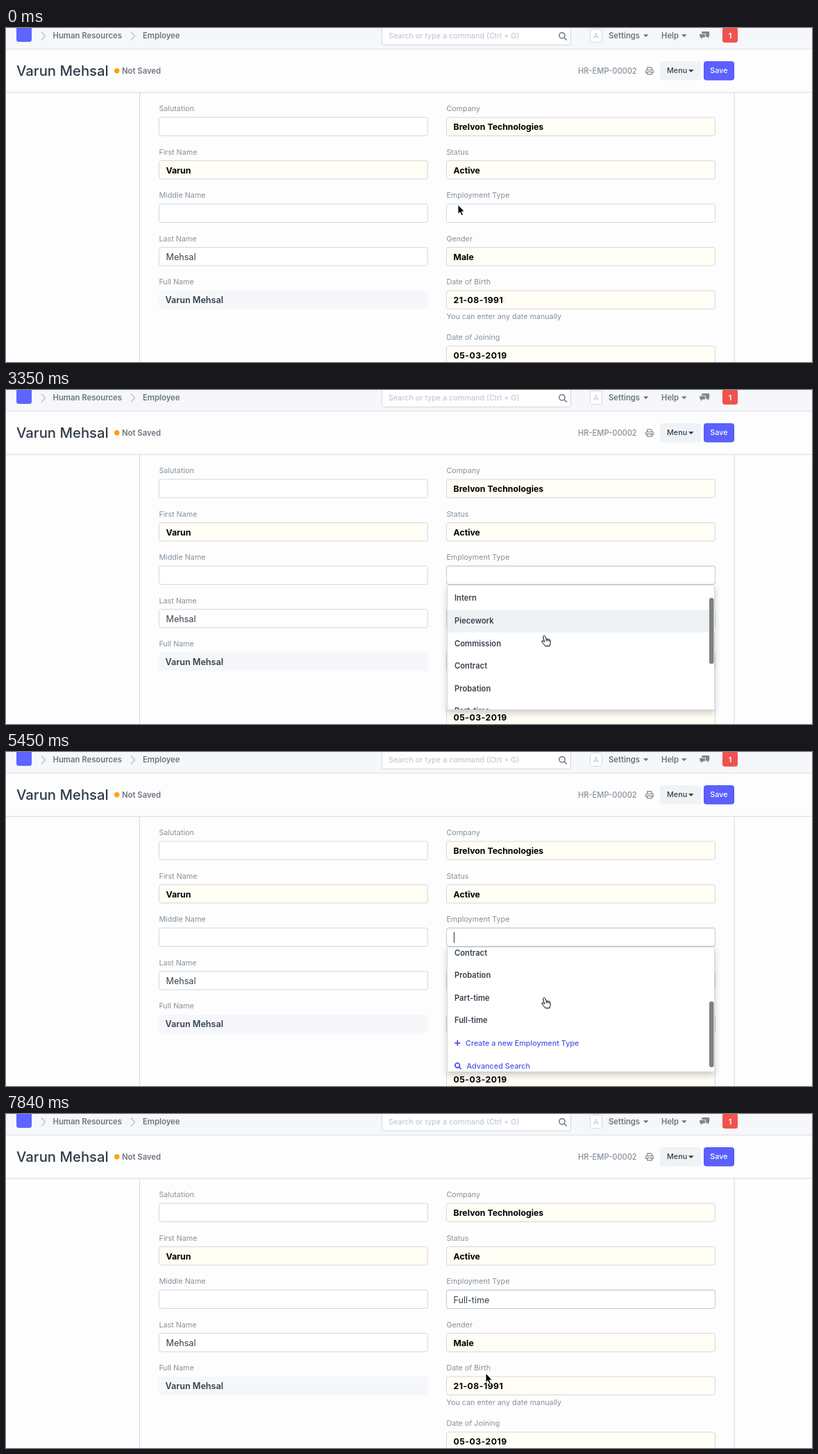
These frames come from a looping animation (1161 by 482 pixels, 8 s). An HTML page:

```html
<!DOCTYPE html>
<html lang="en">
<head>
<meta charset="utf-8">
<title>Employee form</title>
<style>
html, body { margin: 0; width: 100%; height: 100%; overflow: hidden; background: #fdfdfd; }
svg { display: block; }
text { font-family: Inter, "Liberation Sans", sans-serif; font-size: 10.8px; white-space: pre; }
.label { fill: #85919d; font-size: 10.75px; }
.value { fill: #36414c; font-size: 12.6px; }
.must { fill: #000; font-weight: 700; font-size: 12.3px; }
.date { letter-spacing: .035em; }
.nav { fill: #6c7680; font-weight: 600; font-size: 11.3px; }
.item { fill: #36414c; font-weight: 600; font-size: 11.2px; }
.link { fill: #4f52ea; font-weight: 500; }
.box { fill: #fff; stroke: #d1d8dd; }
.line { fill: none; stroke-width: 1.5; }
#menu { filter: drop-shadow(0 4px 5px rgba(0, 0, 0, .2)); }
</style>
</head>
<body>
<svg id="stage" width="1161" height="482" viewBox="0 0 1161 482">
  <path d="M0 0H1161V30H0Z" fill="#f5f7fa"/>
  <path d="M0 30.5H1161" stroke="#dde3e8"/>
  <path d="M192.5 93V482M1049 93V482M0 93H1161" fill="none" stroke="#d1d8dd"/>

  <rect x="15" y="-2" width="22" height="22" rx="3.5" fill="#5e64ff"/>
  <path d="M51 5.5l5.5 6-5.5 6M180 5.5l5.5 6-5.5 6" class="line" stroke="#bcc5cf"/>
  <text x="67.5" y="15.3" class="nav">Human Resources</text>
  <text x="197" y="15.3" class="nav">Employee</text>
  <rect x="541.5" y="-4.5" width="272" height="29" rx="3.5" class="box"/>
  <text x="551" y="15.3" fill="#b8c2cc">Search or type a command (Ctrl + G)</text>
  <g class="line" stroke="#6c7680"><circle cx="801" cy="10.8" r="4.1"/><path d="M804 14l3.8 3.8"/></g>
  <rect x="841.5" y="1.5" width="17" height="19" rx="3" class="box"/>
  <text x="850" y="15.3" text-anchor="middle" fill="#b8c2cc">A</text>
  <text x="868" y="14.7" class="nav">Settings</text>
  <text x="944" y="14.7" class="nav">Help</text>
  <path d="M918 9.3h7.6l-3.8 3.9zM973 9.3h7.6l-3.8 3.9z" fill="#6c7680"/>
  <path d="M1003.5 5h8.5q1.2 0 1.2 1.2v5q0 1.2-1.2 1.2v2.6l-2.8-2.6h-1.4V8h-5.5V6.2q0-1.2 1.2-1.2zM1000.3 8.8h6.6v4.6h-3.3l-2.5 2.6v-2.6h-.8q-1.1 0-1.1-1.1v-2.4q0-1.1 1.1-1.1z" fill="#7c8793"/>
  <rect x="1032" y="-1" width="22" height="22" rx="3.5" fill="#ef5350"/>
  <text x="1043" y="15.3" text-anchor="middle" fill="#fff" font-weight="600">1</text>

  <text x="15" y="69" fill="#303b46" font-weight="500" style="font-size:20.3px">Varun Mehsal</text>
  <circle cx="159.7" cy="61.7" r="3.7" fill="#ffa00a"/>
  <text x="167" y="65.6" class="nav">Not Saved</text>
  <text x="824" y="65.5" fill="#85919d" font-weight="500" style="font-size:11.1px">HR-EMP-00002</text>
  <path d="M923.8 60.5v-3.7h5.2l1.4 1.4v2.3M923.8 64.5h-2.1v-3q0-1 1-1h8.6q1 0 1 1v3h-1.9M923.8 63.3h6.6v3.6h-6.6z" fill="none" stroke="#7c8793" stroke-width="1.2"/>
  <rect x="942" y="48" width="59" height="27.5" rx="3" fill="#f0f3f6"/>
  <text x="952" y="65.3" fill="#36414c" font-weight="500">Menu</text>
  <path d="M983 60h7.6l-3.8 3.9z" fill="#36414c"/>
  <rect x="1005.5" y="48.5" width="43" height="26.5" rx="3" fill="#5c60ff" stroke="#5055fb"/>
  <text x="1027" y="65.3" text-anchor="middle" fill="#fff" font-weight="500">Save</text>

  <g id="form"></g>
  <g id="menu">
    <rect x="635.5" y="281.5" width="385" height="180" rx="2" fill="#fff" stroke="#d1d8dd"/>
    <svg x="636" y="282" width="385" height="179">
      <g id="list"><rect id="hover" width="385" height="32.6" fill="#eff2f5"/></g>
      <rect id="bar" x="377" width="6.5" height="95" rx="3.2" fill="#7f7f7f"/>
    </svg>
  </g>
  <path id="caret" d="M0 260h1v15.5h-1z" fill="#333"/>
  <path id="arrow" d="M0 0V13.5L3 10.8 5.2 15.6 7.5 14.6 5.4 9.9H9.5Z" fill="#000" stroke="#fff"/>
  <path id="hand" d="M-.5.3q1.5-.9 2.2.6l1.5 4q1-.8 2 .2 1.2-.7 2 .5 1.4-.4 1.7 1.2.5 3 0 5l-.8 3.2H1.6q-.8-2-3.5-4.6-1.8-2-1.2-2.7.8-.8 2.6.5l1.2 1-1.9-6.7q-.2-1.6.7-2.2zM3.2 5v3M5.2 5.4v2.6M7.2 6v2.2" fill="#fff" stroke="#000"/>
</svg>
<script>
const $ = id => document.getElementById(id);
const LOOP = 8000, ROW = 32.6, TOP = 282, CLOSE = 7390;
const LEFT = 220, RIGHT = 634;

function field(x, y, label, value = "", kind = "value") {
  const fixed = kind === "fixed";
  const fill = kind.startsWith("must") ? "#fffdf4" : fixed ? "#f5f7fa" : "#fff";
  const text = fixed
    ? `<text x="${x + 9.5}" y="${y + 18}" class="value" font-weight="600">${value}</text>`
    : `<text x="${x + 10.5}" y="${y + 18.7}" class="${kind}">${value}</text>`;
  return `<text x="${x + .4}" y="${y - 8.2}" class="label">${label}</text>
    <rect x="${x + .5}" y="${y + .5}" width="387" height="26.5" rx="3" fill="${fill}"
      stroke="${fixed ? "none" : "#d1d8dd"}"/>${text}`;
}

const rowY = i => 128.5 + 62.5 * i;
$("form").innerHTML = [
  ["Salutation"],
  ["First Name", "Varun", "must"],
  ["Middle Name"],
  ["Last Name", "Mehsal"],
  ["Full Name", "Varun Mehsal", "fixed"]
].map((f, i) => field(LEFT, rowY(i), ...f)).join("") + [
  ["Company", "Brelvon Technologies", "must"],
  ["Status", "Active", "must"],
  ["Employment Type"],
  ["Gender", "Male", "must"],
  ["Date of Birth", "21-08-1991", "must date"]
].map((f, i) => field(RIGHT, rowY(i), ...f)).join("") +
  field(RIGHT, 458.5, "Date of Joining", "05-03-2019", "must date") +
  `<text x="634.5" y="419.7" class="label">You can enter any date manually</text>
  <rect id="focus" x="634.5" y="254" width="387" height="26.5" rx="3" fill="none" stroke="#c4ccd4"/>
  <text id="chosen" x="644.5" y="272.5" class="value">Full-time</text>`;

const items = ["Apprentice", "Intern", "Piecework", "Commission", "Contract", "Probation", "Part-time", "Full-time"];
const mid = i => ROW * i + 15.7;
$("list").innerHTML += items.map((s, i) => `<text x="10" y="${mid(i) + 4}" class="item">${s}</text>`).join("") +
  `<text x="26" y="${mid(8) + 4}" class="link">Create a new Employment Type</text>
  <text x="27.5" y="${mid(9) + 4}" class="link">Advanced Search</text>
  <g class="line" stroke="#4f52ea" style="stroke-width:1.8">
    <path d="M10.3 ${mid(8)}h8M14.3 ${mid(8) - 4}v8"/>
    <circle cx="14.2" cy="${mid(9) - .5}" r="3.3"/><path d="M16.6 ${mid(9) + 2}l3 3"/>
  </g>`;

// Linear interpolation through [time, value] points
function at(points, t) {
  let i = points.findIndex(p => p[0] > t);
  if (i < 0) return points[points.length - 1][1];
  if (!i) return points[0][1];
  const [t0, a] = points[i - 1], [t1, b] = points[i];
  return a + (b - a) * (t - t0) / (t1 - t0);
}

const scroll = [[3050, 0], [3200, 12], [3350, 30], [3500, 46], [3800, 63], [4100, 72], [4400, 75.5],
  [4550, 75.5], [4700, 78], [4850, 88], [5150, 117], [5450, 138.4], [5600, 146.5]];
const mouseX = [[800, 651], [1550, 818], [1850, 818], [2600, 775], [6350, 775], [7100, 691]];
const mouseY = [[800, 255], [1175, 249], [1550, 252], [1850, 252], [2600, 354.5], [6350, 354.5], [7100, 374]];

const show = (id, on) => $(id).setAttribute("visibility", on ? "visible" : "hidden");
const move = (id, x, y) => $(id).setAttribute("transform", `translate(${x} ${y})`);

function draw(time) {
  const t = Math.floor((time + (time > 6950 ? 10 : 0) - 50) / 150) * 150 + 50;
  const open = t >= 950 && time < CLOSE, done = time >= CLOSE;
  const x = at(mouseX, t), y = at(mouseY, t), s = at(scroll, t);
  const hand = open && y > TOP;

  // The highlighted row changes only while the pointer moves
  const row = Math.max(0, Math.floor((y - TOP + (t > 6350 ? s : 0)) / ROW));
  $("hover").setAttribute("y", row * ROW);
  move("list", 0, -s);
  $("bar").setAttribute("y", 1.5 + s * .553);
  show("bar", open && t >= 3200 && t < 6200);
  $("menu").style.display = open ? "" : "none";
  show("focus", t >= 950);
  show("chosen", done);

  const phase = t % 1000;
  show("caret", done ? time < 7840 : phase >= 400 && phase < 895);
  move("caret", done ? 697 : 645, 0);
  show("arrow", !hand);
  show("hand", hand);
  move(hand ? "hand" : "arrow", x, y);
}

const start = performance.now();
function tick() {
  draw((performance.now() - start) % LOOP);
  requestAnimationFrame(tick);
}
tick();
</script>
</body>
</html>
```
